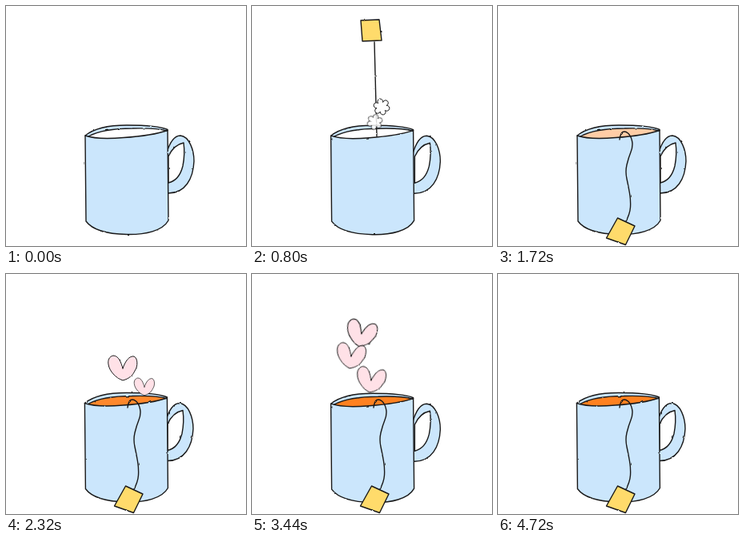
Write an HTML page that moves like this. It is 300 px wide and 300 px high and loops after 4.8 s.

```html
<!DOCTYPE html>
<html lang="en">
<head>
<meta charset="utf-8">
<title>Cup of tea</title>
<style>
  html, body { margin: 0; width: 100%; height: 100%; overflow: hidden; background: #fff; }
  svg { display: block; width: 100vw; height: 100vh; }
  .ink { stroke: #191919; stroke-width: 1.4; stroke-linecap: round; stroke-linejoin: round; }
  .line { fill: none; }
  .blue { fill: #cbe6fc; }
  .heart { fill: #ffe1e7; stroke-width: 1; }
  .puff { fill: #fff; stroke-width: 1; }
</style>
</head>
<body>
<svg viewBox="0 0 300 300" xmlns="http://www.w3.org/2000/svg">
  <defs id="defs">
    <clipPath id="above"><path d="M0-60H300V153L202 155C180 162 150 164 100 163L0 163Z"/></clipPath>
  </defs>
  <g id="cup">
    <path id="handle" class="ink blue" fill-rule="evenodd" d="M200 186C204 172 209 162 218 162C229 163 235 180 235 194C234 216 224 234 203 234L200 234Z
      M203 188C207 179 212 173 222 171C223 178 223 190 221 200C218 212 212 219 203 221Z"/>
    <path class="ink blue" d="M99 162C110 153 130 149 151 149C172 149 192 150 202 154.500L203 268C196 281 174 286 151 285.500C128 285 108 280 100 269Z"/>
    <path id="tea" d="M103 163C116 156 136 153 158 153C176 152.500 191 153 201 156C187 161 168 163 147 164.500C130 166 114 166 103 163Z"/>
    <path class="ink line" d="M103 163C116 156 136 153 158 153C176 152.500 191 153 201 156"/>
    <path class="ink line" d="M99 162C112 166.500 130 166 147 164.500C170 163 189 160 202 155.500"/>
  </g>
  <g clip-path="url(#above)">
    <path id="bag" class="ink" fill="#f4e6cf" filter="url(#rough)" d="M-6 0H6L14 9V38H-14V9Z"/>
  </g>
  <g id="drop" filter="url(#rough)">
    <path id="string" class="ink line"/>
    <path id="tag" class="ink" fill="#ffdb6b"/>
  </g>
  <g id="float"></g>
</svg>
<script>
const $ = id => document.getElementById(id);
const LOOP = 4800, STEP = 40, RISE = 0.1;
const clamp = v => Math.max(0, Math.min(1, v));
const mix = (a, b, k) => a + (b - a) * k;
const mixPt = (a, b, k) => [mix(a[0], b[0], k), mix(a[1], b[1], k)];

// Hand-drawn edges: three alternating looks for the cup, one for the rest
const filter = (id, seed) => `<filter id="${id}" filterUnits="userSpaceOnUse" x="-40" y="-60" width="380" height="400" color-interpolation-filters="sRGB">
  <feTurbulence type="fractalNoise" baseFrequency=".14" numOctaves="2" seed="${seed}"/>
  <feDisplacementMap in="SourceGraphic" scale="1.8" xChannelSelector="R" yChannelSelector="G"/></filter>`;
$('defs').insertAdjacentHTML('beforeend',
  filter('rough', 5) + filter('boil0', 3) + filter('boil1', 8) + filter('boil2', 14));

const HEART = 'M0 1C-2-6-5-15-12-15C-17-14-19-9-18-4C-17 4-9 13 0 16C8 14 13 9 15 4C19-1 19-12 14-14C8-15 3-8 0 1Z';
const cloud = n => {
  const at = i => {
    const a = i * 2 * Math.PI / n - 1.3;
    return `${(6.2 * Math.cos(a)).toFixed(1)} ${(6.2 * Math.sin(a)).toFixed(1)}`;
  };
  let d = 'M' + at(0);
  for (let i = 1; i <= n; i++) d += `A3.4 3.4 0 1 1 ${at(i)}`;
  return d + 'Z';
};

// Seen at time t at x, y; shown from start to end while rising steadily
const floats = [
  { t: 800, x: 162, y: 126, size: 1, turn: 0, start: 600, end: 1160, kind: 'puff' },
  { t: 800, x: 153.5, y: 145, size: .95, turn: 25, start: 740, end: 1160, kind: 'puff' },
  { t: 2320, x: 146, y: 117, size: 1, turn: 0, start: 2000, end: 3160 },
  { t: 2320, x: 173, y: 140.5, size: .7, turn: 0, start: 2200, end: 3240 },
  { t: 3440, x: 137, y: 74, size: 1.04, turn: 12, start: 2700, end: 3720 },
  { t: 3440, x: 124, y: 102, size: 1, turn: 7, start: 2980, end: 3920 },
  { t: 3440, x: 149, y: 132, size: 1, turn: 8, start: 3280, end: 4100 },
  { t: 4200, x: 163.5, y: 69.5, size: .98, turn: 0, start: 3480, end: 4300 },
  { t: 4200, x: 133, y: 114, size: 1.1, turn: 11, start: 3860, end: 4720 }
];
for (const f of floats) {
  f.el = document.createElementNS('http://www.w3.org/2000/svg', 'path');
  f.el.setAttribute('d', f.kind ? cloud(6) : HEART);
  f.el.setAttribute('class', 'ink ' + (f.kind || 'heart'));
  f.el.setAttribute('filter', 'url(#rough)');
  $('float').append(f.el);
}

const hung = [[152, 167], [153, 159], [159, 156], [166, 162], [169, 175], [163, 190],
  [159, 207], [163, 225], [166, 243], [165, 260], [159, 271]];
const tagUp = [[-13, -13], [10, -14], [13, 12], [-11, 13]];
const tagHung = [[149.5, 265], [171, 275], [159.5, 298.5], [135.5, 290]];

const smooth = pts => {
  let d = 'M' + pts[0];
  for (let i = 1; i < pts.length - 1; i++) {
    const end = i === pts.length - 2 ? pts[i + 1] : mixPt(pts[i], pts[i + 1], .5);
    d += `Q${pts[i]} ${end}`;
  }
  return d;
};

function drawBag(t) {
  const y = 31 + .27 * (Math.min(t, 1120) - 800);
  const s = clamp((t - 1120) / 560);
  const bagY = y + 13 + 128;
  $('bag').setAttribute('transform', `translate(155 ${bagY})`);
  $('bag').style.display = s > 0 ? 'none' : '';

  const corners = tagUp.map(([dx, dy], i) => mixPt([149 + dx, y + dy], tagHung[i], s));
  $('tag').setAttribute('d', 'M' + corners.join('L') + 'Z');

  const low = [156, Math.min(bagY, 163)], high = [153, y + 14];
  const last = hung.length - 1;
  $('string').setAttribute('d', smooth(hung.map((p, i) => {
    const q = mixPt(mixPt(low, high, i / last), p, s);
    q[0] += 14 * Math.sin(Math.PI * i / last) * Math.sin(Math.PI * s);
    return q;
  })));
}

function draw(t) {
  const pose = Math.floor(t / 80) % 3;
  $('cup').setAttribute('filter', `url(#boil${pose})`);
  $('cup').setAttribute('transform', `translate(${[0, -.4, -.6][pose]} ${[0, .2, -.5][pose]})`);
  $('handle').setAttribute('transform', `translate(${[0, .8, -.4][pose]} 0)`);

  const brew = clamp((t - 1280) / 1100);
  $('tea').setAttribute('fill', `rgb(255,${mix(255, 129, brew)},${mix(255, 32, brew)})`);
  drawBag(t);

  for (const f of floats) {
    const on = t >= f.start && t < f.end;
    f.el.style.display = on ? '' : 'none';
    if (!on) continue;
    const y = f.y - RISE * (t - f.t);
    f.el.setAttribute('transform', `translate(${f.x} ${y}) rotate(${f.turn}) scale(${f.size})`);
    if (f.kind) f.el.style.opacity = clamp((t - f.start + STEP) / 120);
  }
}

function tick() {
  const t = performance.now() % LOOP;
  draw(Math.floor(t / STEP) * STEP);
  requestAnimationFrame(tick);
}
tick();
</script>
</body>
</html>
```
